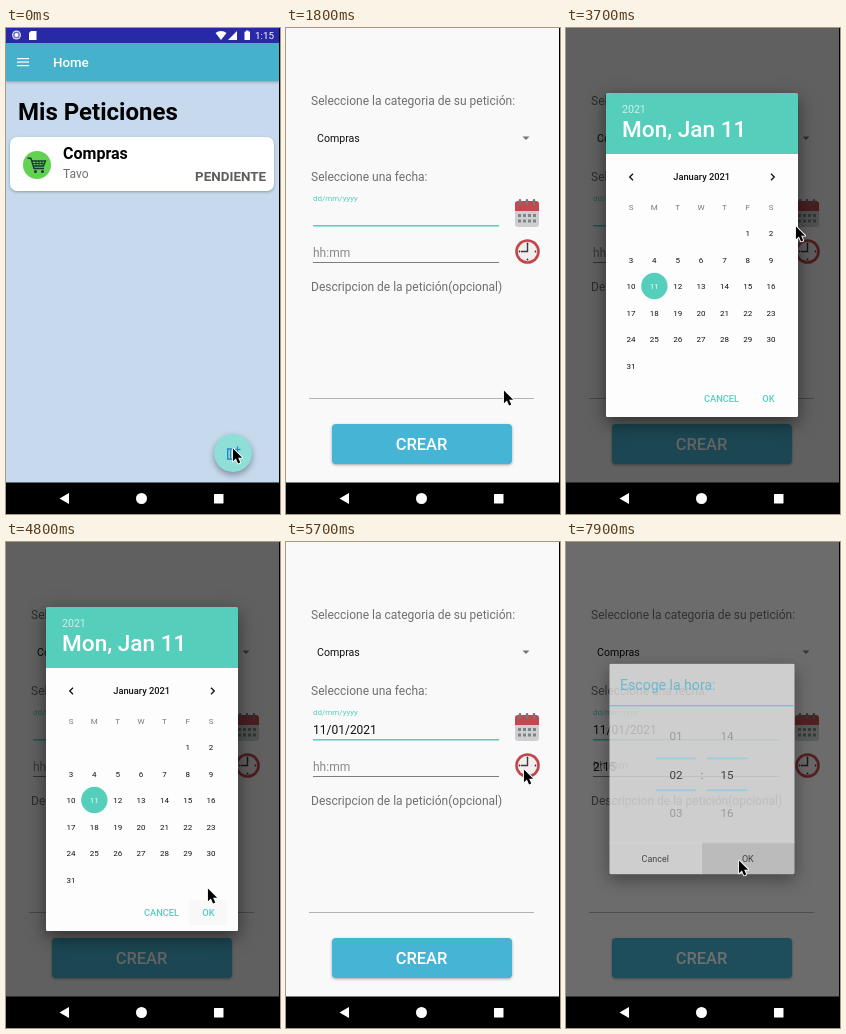
These frames come from a looping animation (274 by 486 pixels, 8 s). An HTML page with a canvas:

```html
<!DOCTYPE html>
<html lang="es">
<head>
<meta charset="utf-8">
<style>
html, body { margin: 0; width: 100%; height: 100%; overflow: hidden; background: #000 }
canvas { display: block }
</style>
</head>
<body>
<canvas id="stage" width="274" height="486"></canvas>
<script>
const c = document.getElementById('stage').getContext('2d');
const LOOP = 8000, TEAL = '#55cebc', BLUE = '#46b4d4', GRAY = '#6f6f6f', DIM = 0.61;

const seg = (t, a, b) => Math.min(1, Math.max(0, (t - a) / (b - a)));
const ease = k => k * k * (3 - 2 * k);
const mix = (a, b, k) => a + (b - a) * k;

function rect(x, y, w, h, color, r = 0) {
  c.fillStyle = color;
  c.beginPath();
  c.roundRect(x, y, w, h, r);
  c.fill();
}
function disc(x, y, r, color) {
  c.fillStyle = color;
  c.beginPath();
  c.arc(x, y, r, 0, 7);
  c.fill();
}
function poly(points, color) {
  c.fillStyle = color;
  c.beginPath();
  points.forEach(p => c.lineTo(...p));
  c.closePath();
  c.fill();
}
function line(points, color, width = 1) {
  c.strokeStyle = color;
  c.lineWidth = width;
  c.beginPath();
  points.forEach(p => c.lineTo(...p));
  c.stroke();
}
function text(s, x, y, size, color, weight = 400, align = 'left') {
  c.font = `${weight} ${size}px Roboto, sans-serif`;
  c.textAlign = align;
  c.fillStyle = color;
  c.fillText(s, x, y);
}
function shadowed(blur, dy, alpha, draw) {
  c.save();
  c.shadowColor = `rgba(0,0,0,${alpha})`;
  c.shadowBlur = blur;
  c.shadowOffsetY = dy;
  draw();
  c.restore();
}
function group(alpha, draw) {
  c.save();
  c.globalAlpha *= alpha;
  draw();
  c.restore();
}
// Shadow only outside the box, so a fading panel stays clean
function boxShadow(x, y, w, h) {
  c.save();
  c.beginPath();
  c.rect(0, 0, 273, 455);
  c.rect(x, y, w, h);
  c.clip('evenodd');
  shadowed(16, 6, 0.5, () => rect(x, y, w, h, '#000'));
  c.restore();
}

function statusBar() {
  rect(0, 0, 273, 15, '#2729a6');
  disc(10.5, 7, 4.5, '#d8d8f2');
  disc(10.5, 7, 3.3, '#6a6bc4');
  disc(10.5, 7, 2, '#fff');
  poly([[25, 3], [30.5, 3], [30.5, 12], [23, 12], [23, 5]], '#fff');
  poly([[209.5, 5], [212, 3.6], [215, 3], [218, 3.6], [220.5, 5], [215, 12]], '#fff');
  poly([[231, 3], [231, 12], [222, 12]], '#fff');
  rect(238.5, 3.5, 5.5, 8.5, '#fff', 0.5);
  rect(240, 2.5, 2.5, 1.5, '#fff');
  text('1:15', 249, 11, 9.8, '#fff');
}

function cart() {
  disc(31, 137, 14, '#63d151');
  const ink = '#20333a';
  line([[21.5, 130], [25, 130.5], [28, 140.5], [38, 140.5]], ink, 1.4);
  line([[26, 133], [39.5, 133], [37.5, 138], [27.5, 138]], ink, 1.3);
  line([[27, 135.5], [38.5, 135.5]], ink, 0.9);
  [30, 33, 36].forEach(x => line([[x, 133], [x, 138]], ink, 0.9));
  disc(29.5, 143.5, 1.5, ink);
  disc(36.5, 143.5, 1.5, ink);
}

function home(t) {
  rect(0, 0, 273, 455, '#c6d9ed');
  shadowed(3, 1, 0.3, () => rect(0, 15, 273, 38, '#46b1cb'));
  statusBar();
  [30.5, 34, 37.5].forEach(y => rect(11, y - 0.5, 12, 1.2, '#fff'));
  text('Home', 47, 39, 13.3, '#fff', 500);
  text('Mis Peticiones', 12, 92, 24, '#000', 700);
  shadowed(3, 1, 0.3, () => rect(4, 109, 264, 54, '#fff', 7));
  cart();
  text('Compras', 57, 131, 16, '#000', 700);
  text('Tavo', 57, 150, 12, GRAY);
  text('PENDIENTE', 260, 153, 13.4, '#5e5e5e', 700, 'right');

  const press = seg(t, 650, 900);
  shadowed(6 + 4 * press, 3 + 2 * press, 0.35, () => disc(227, 425, 19, '#8fdfd9'));
  if (press) group(0.3 * (1 - seg(t, 900, 1200)), () => disc(227, 425, 19 * press, '#fff'));
  line([[228, 421], [221.7, 421], [221.7, 431], [232, 431], [232, 427]], '#2b86bd', 1.4);
  line([[224.5, 422], [224.5, 430]], '#2b86bd', 1.2);
  line([[228.5, 421.5], [234.5, 421.5]], '#2b86bd', 1.3);
  line([[231.5, 418.5], [231.5, 424.5]], '#2b86bd', 1.3);
}

function calendarIcon() {
  rect(229, 174, 24, 25, '#cdcfd0', 3);
  rect(229, 173, 24, 10, '#c04a4f', [3, 3, 0, 0]);
  [234, 241, 248].forEach(x => rect(x - 1.2, 171, 2.4, 6, '#74787a', 1));
  for (let i = 0; i < 8; i++)
    rect(232 + i % 4 * 5, 186 + (i >> 2) * 5.5, 3, 3, '#7e8486');
}

function clockIcon() {
  disc(241.5, 223.5, 12.3, '#c2474b');
  disc(241.5, 223.5, 9.7, '#f3eeee');
  for (let i = 0; i < 4; i++) {
    const a = i * Math.PI / 2;
    disc(241.5 + 8 * Math.cos(a), 223.5 + 8 * Math.sin(a), 0.9, '#333');
  }
  line([[241.5, 216], [241.5, 223.5], [235, 223.5]], '#3a3a3a', 1.4);
}

function form(t) {
  rect(0, 0, 273, 455, '#f9f9f9');
  text('Seleccione la categoria de su petición:', 25, 77, 12, GRAY);
  text('Compras', 31, 114, 10.6, '#111');
  poly([[236.5, 108.5], [243.5, 108.5], [240, 112]], '#757575');
  text('Seleccione una fecha:', 25, 153, 12, GRAY);
  text('dd/mm/yyyy', 27, 173, 8, TEAL);
  if (t > 4900) text('11/01/2021', 27, 192, 12, '#111');
  rect(27, 197, 186, 1.5, TEAL);
  const up = seg(t, 7880, 8030);
  text('hh:mm', 27, mix(229, 213, up), mix(12, 8, up), '#8a8a8a');
  if (t > 7840) text('2:15', 27, 229, 12, '#111');
  rect(27, 234, 186, 1, '#7d7d7d');
  text('Descripcion de la petición(opcional)', 25, 263, 12, GRAY);
  rect(23, 370, 225, 1, '#b4b4b4');
  calendarIcon();
  clockIcon();
  shadowed(3, 1, 0.35, () => rect(46, 396, 180, 40, BLUE, 4));
  text('CREAR', 135.5, 422, 16.5, '#fff', 500, 'center');
}

function dim(alpha) {
  rect(0, 0, 273, 455, `rgba(0,0,0,${alpha})`);
}

function datePicker(t) {
  const shut = seg(t, 4950, 5150);
  dim(DIM * seg(t, 3100, 3400) * (1 - seg(t, 4950, 5250)));
  group(0.88 * seg(t, 3080, 3190) + 0.12 * seg(t, 3200, 3300) - shut, () => {
    boxShadow(40, 65, 192, 324);
    rect(40, 126, 192, 263, '#fdfdfd', [0, 0, 1.5, 1.5]);
    rect(40, 65, 192, 61, TEAL, [1.5, 1.5, 0, 0]);
    text('2021', 56, 85, 10.6, 'rgba(255,255,255,.7)');
    text('Mon, Jan 11', 56, 109, 22.6, '#fff', 500);
    const press = seg(t, 4700, 4950);
    if (press) rect(183, 358, 38, 25, `rgba(0,0,0,${0.05 * press})`, 2);
    text('CANCEL', 155.5, 374, 9.3, TEAL, 500, 'center');
    text('OK', 202.5, 374, 9.3, TEAL, 500, 'center');
    group(seg(t, 3200, 3400), monthGrid);
  });
}

function monthGrid() {
  text('January 2021', 135.7, 152, 9.3, '#111', 500, 'center');
  line([[67, 145.7], [63.7, 149], [67, 152.3]], '#111', 1.3);
  line([[205, 145.7], [208.3, 149], [205, 152.3]], '#111', 1.3);
  const colX = i => 65 + i * 23.35;
  [...'SMTWTFS'].forEach((d, i) => text(d, colX(i), 182.3, 8, '#777', 400, 'center'));
  disc(colX(1), 258, 13.2, TEAL);
  for (let day = 1; day <= 31; day++) {
    const cell = day + 4;
    const y = 205 + Math.floor(cell / 7) * 26.6;
    text(day, colX(cell % 7), y + 3, 8, day === 11 ? '#e8fffb' : '#111', 400, 'center');
  }
}

function wheel(x, value, range) {
  c.save();
  c.beginPath();
  c.rect(x - 22, 176, 44, 115);
  c.clip();
  const near = Math.round(value);
  for (let n = near - 2; n <= near + 2; n++) {
    const off = n - value;
    const shade = Math.round(mix(10, 135, Math.min(1, Math.abs(off))));
    text(String((n + range) % range).padStart(2, '0'), x, 237 + off * 40, 12,
      `rgb(${shade},${shade},${shade})`, 400, 'center');
  }
  c.restore();
  [215, 248].forEach(y => rect(x - 21, y, 42, 2, '#8ccbe4'));
}

function timePicker(t) {
  const open = ease(seg(t, 6000, 6200)), shut = seg(t, 7860, 8010);
  const scale = mix(0.9, 1, open) - 0.13 * shut;
  dim(DIM * seg(t, 6000, 6400) * (1 - shut * shut));
  group(open * (1 - shut), () => {
    c.translate(136, 227);
    c.scale(scale, scale);
    c.translate(-136, -227);
    boxShadow(40, 118, 192, 218);
    rect(40, 118, 192, 218, '#f3f3f3', 1.5);
    text('Escoge la hora:', 51, 145, 14.6, '#46b1d0');
    rect(40, 161, 192, 1, '#46b1d0');
    wheel(109, 1 + ease(seg(t, 6600, 7050)), 24);
    wheel(162, 15, 60);
    text(':', 136, 237, 12, '#555', 400, 'center');
    const press = seg(t, 7600, 7750);
    if (press) rect(135.5, 303, 96.5, 33, `rgba(0,0,0,${0.12 * press})`);
    rect(40, 303, 192, 1, '#d6d6d6');
    rect(135, 303, 1, 33, '#d6d6d6');
    text('Cancel', 87.5, 323, 9.3, '#111', 400, 'center');
    text('OK', 183.5, 323, 9.3, '#111', 400, 'center');
  });
}

function navBar() {
  rect(0, 454.4, 274, 32, '#000');
  poly([[53.5, 470.5], [63, 465], [63, 476]], '#fff');
  disc(135.5, 470.5, 5.5, '#fff');
  rect(208, 466, 9.5, 9.5, '#fff', 0.5);
}

// Pointer stops: time, x, y
const stops = [
  [0, 226, 419], [1300, 226, 419], [1750, 217, 361], [1950, 217, 361],
  [2650, 229, 197], [3700, 229, 197], [4500, 201, 345], [5050, 201, 345],
  [5600, 237, 226], [6150, 237, 226], [6480, 103, 233], [6600, 103, 233],
  [7000, 103, 195], [7150, 103, 195], [7550, 172, 317], [LOOP, 172, 317]
];
function pointer(t) {
  const i = stops.findIndex(s => s[0] > t);
  const a = stops[i - 1], b = stops[i];
  const k = ease(seg(t, a[0], b[0]));
  c.save();
  c.translate(mix(a[1], b[1], k) + 0.5, mix(a[2], b[2], k) + 1.5);
  c.scale(0.88, 0.88);
  const arrow = [[0.5, 0], [0.5, 14.5], [3.9, 11.5], [6.3, 17], [8.8, 16], [6.4, 10.6], [11, 10.4]];
  c.lineJoin = 'round';
  line([...arrow, arrow[0]], '#fff', 2);
  poly(arrow, '#000');
  c.restore();
}

function frame(now) {
  const t = now % LOOP;
  rect(0, 0, 274, 486, '#000');
  rect(0, 0, 273, 455, '#f9f9f9');
  if (t < 1400) home(t);
  if (t >= 1050) {
    const enter = seg(t, 1050, 1350);
    group(enter, () => {
      c.translate(0, 40 * (1 - ease(enter)));
      form(t);
    });
  }
  if (t > 3080 && t < 5250) datePicker(t);
  if (t > 6000) timePicker(t);
  navBar();
  pointer(t);
  requestAnimationFrame(frame);
}
requestAnimationFrame(frame);
</script>
</body>
</html>
```
